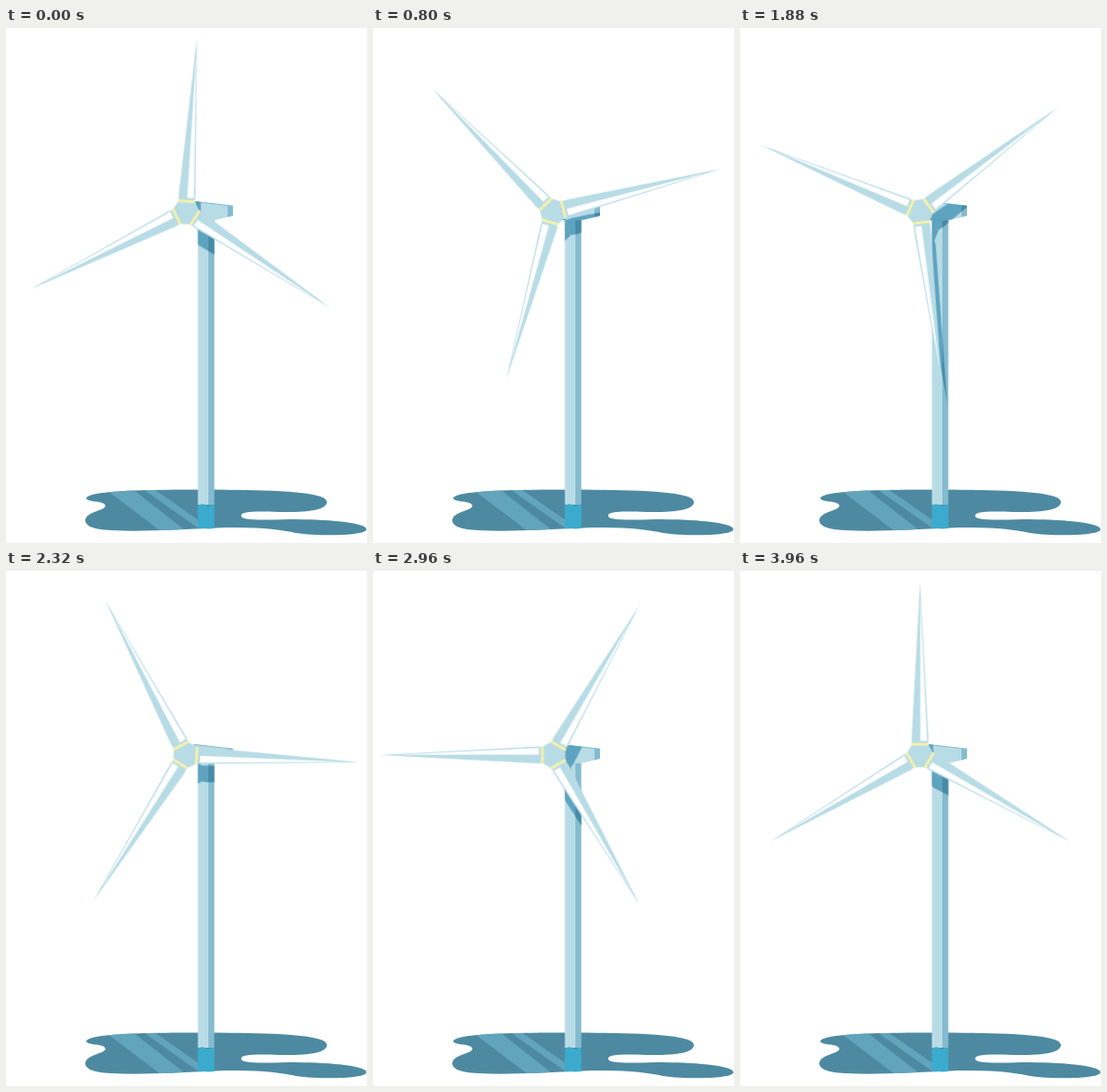
An HTML page that plays this animation: 396 px wide and 565 px high, repeating every 4000 ms.

```html
<!DOCTYPE html>
<html lang="en">
<head>
<meta charset="utf-8">
<title>Wind turbine</title>
<style>
  html, body { margin: 0; width: 100%; height: 100%; overflow: hidden; background: #fff; }
  svg { display: block; width: 396px; height: 565px; }
  .spin { animation: spin 4s steps(100) -1ms infinite; }
  @keyframes spin {
    from { transform: rotate(3.6deg); }
    to { transform: rotate(363.6deg); }
  }
  .light { fill: #b8dce6; }
  .side { fill: #85bbcf; }
  .pool { fill: #4d8aa2; }
  .gleam { fill: #61a4bc; }
</style>
</head>
<body>
<svg viewBox="0 0 396 565">
  <defs>
    <path id="pool" d="M88 516C90 509 130 506.500 210 506.500C300 506.500 352 509 352 520C352 529 330 531.500 300 531C275 530 258 530 258 535C258 540 275 540 310 539C350 539 395 542 395.500 550C395 557 345 558 318 554C300 550 270 547 230 548.500C190 550 150 553 115 551C95 550 87 546 87 540C88 530 109 530 109 524C108 518 90 521 88 516Z"/>
    <clipPath id="inPool"><use href="#pool"/></clipPath>

    <path id="lit" d="M210.500 211H222V523H210.500ZM206 190L243 194.500V207.500L228 211H206Z"/>
    <path id="shaded" d="M222 211H228.500V523H222ZM243 194.500L249 195V206L243 207.500Z"/>
    <clipPath id="onLit"><use href="#lit"/></clipPath>
    <clipPath id="onShaded"><use href="#shaded"/></clipPath>

    <path id="blade" d="M0 -190.500L9.300 -17L8.500 -11H-8.500L-9.300 -17Z"/>
    <path id="hub" d="M-9 -11.500H9L14.500 -2L5.500 13.500H-5.500L-14.500 -2Z"/>
    <g id="silhouette">
      <use href="#blade"/>
      <use href="#blade" transform="rotate(120)"/>
      <use href="#blade" transform="rotate(240)"/>
      <use href="#hub"/>
    </g>
    <g id="trim">
      <path fill="#fff" d="M.4 -15.500H7.700L.2 -174Z"/>
      <path stroke="#f4f0ac" stroke-width="3" d="M-9.500 -11.700H9.500"/>
    </g>
  </defs>

  <use href="#pool" class="pool"/>
  <g class="gleam" clip-path="url(#inPool)">
    <path d="M109 506H139L199 553H171Z"/>
    <path d="M150.500 506H162.500L230 553H217Z"/>
  </g>

  <use href="#lit" class="light"/>
  <use href="#shaded" class="side"/>
  <path fill="none" stroke="#85bbcf" d="M206 190.300L249 195.300"/>
  <path fill="#3babcd" d="M210.500 524Q215 521 219 523.500Q222 525.500 224.500 523.500Q226.500 522 228.500 523.500V549L222 549.500L210.500 548.500Z"/>

  <g clip-path="url(#onLit)" fill="#5ea3bf">
    <g transform="translate(203.300 221.800)"><use href="#silhouette" class="spin"/></g>
  </g>
  <g clip-path="url(#onShaded)" fill="#478ba7">
    <g transform="translate(203.300 221.800)"><use href="#silhouette" class="spin"/></g>
  </g>

  <g transform="translate(197.500 201.800)">
    <g class="spin">
      <use href="#silhouette" class="light"/>
      <use href="#trim"/>
      <use href="#trim" transform="rotate(120)"/>
      <use href="#trim" transform="rotate(240)"/>
    </g>
  </g>
</svg>
</body>
</html>
```
